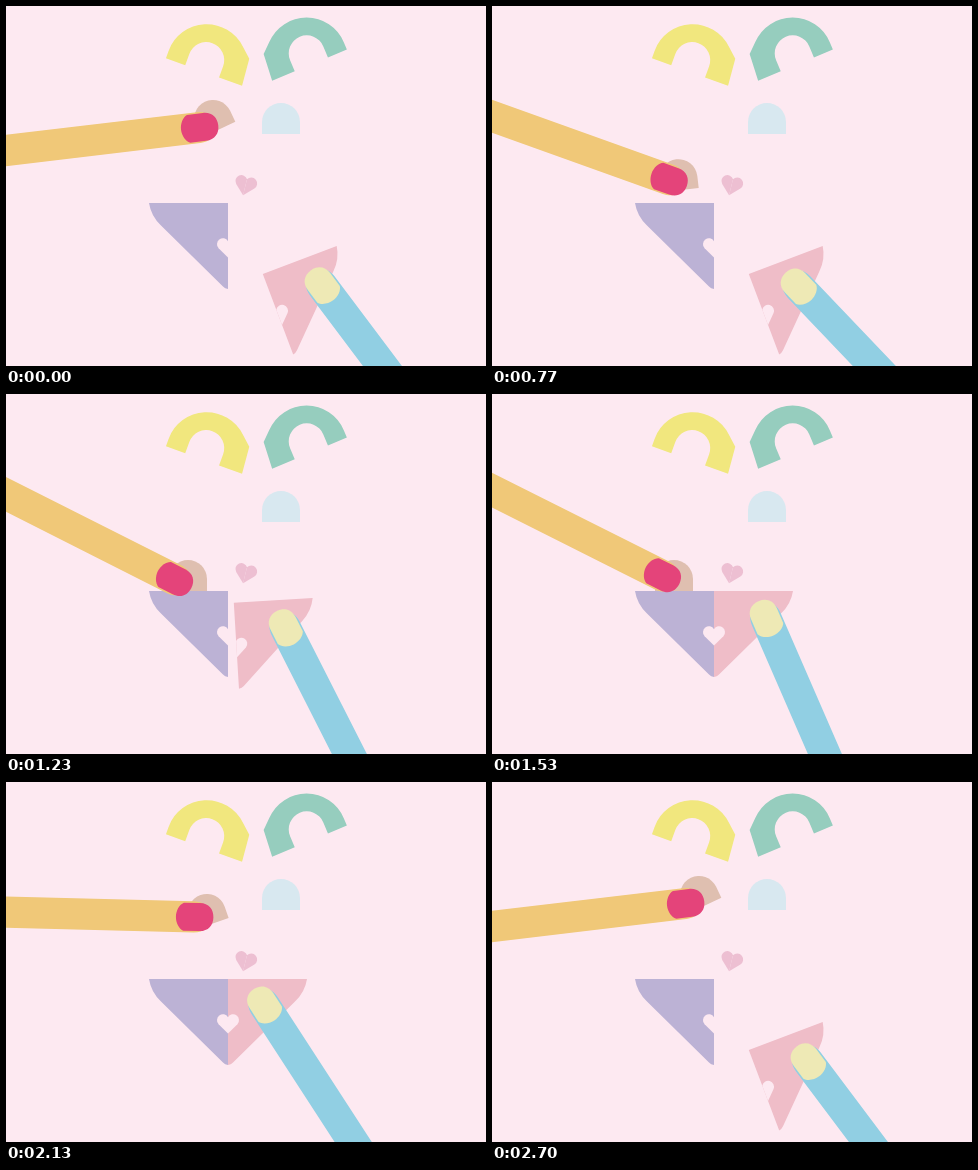
These frames come from a looping animation (480x360 px, 3160 ms). An HTML page with a canvas:

```html
<!DOCTYPE html>
<html lang="en">
<head>
<meta charset="utf-8">
<title>Paper pieces</title>
<style>
  html, body { margin: 0; width: 100%; height: 100%; overflow: hidden; background: #fde9f1; }
  canvas { display: block; width: 100vw; height: 100vh; }
</style>
</head>
<body>
<canvas id="stage"></canvas>
<script>
const W = 480, H = 360, LOOP = 3160, END = 2700, STEP = 100 / 3;
const BG = '#fde9f1';
const canvas = document.getElementById('stage');
const ctx = canvas.getContext('2d');

const pose = (x, y, deg) => ({ x, y, deg });

function ease(t, from, to) {
  const u = Math.min(1, Math.max(0, (t - from) / (to - from)));
  return u * u * (3 - 2 * u);
}

function mix(a, b, k) {
  const lerp = key => a[key] + (b[key] - a[key]) * k;
  return pose(lerp('x'), lerp('y'), lerp('deg'));
}

function at({ x, y, deg }, draw, flip = 1) {
  ctx.save();
  ctx.translate(x, y);
  ctx.rotate(deg * Math.PI / 180);
  ctx.scale(flip, 1);
  draw();
  ctx.restore();
}

function fill(path, color) {
  ctx.fillStyle = color;
  ctx.fill(new Path2D(path));
}

// An arch on two feet with one pointed shoulder
function arch(place, color, flip) {
  at(place, () => fill('M-40.5 0V-8A40.5 40.5 0 0 1 28 -37L38 -28L40.5 0H16V-12A18 18 0 0 0 -20 -12V0Z', color), flip);
}

function dome(place, color) {
  at(place, () => fill('M-19 12V0A19 19 0 0 1 19 0V12Z', color));
}

function halfHeart(color) {
  fill('M0 10.5V-5.8A5.9 5.9 0 1 1 9.4 1.2Z', color);
}

function heart(place, color) {
  for (const side of [-1, 1]) at(place, () => halfHeart(color), side);
}

// Half of the triangle: inner top corner at the origin, half a heart cut out
function wedge(place, color, flip) {
  at(place, () => {
    fill('M0 0H79Q77 13 67 22.5L5 83.5Q3 85.6 0 86Z', color);
    ctx.translate(0, 44);
    halfHeart(BG);
  }, flip);
}

// The nail sits on the origin, the tip points along the angle
function finger(place, skin, polish) {
  at(place, () => {
    fill('M-320 -15.6H-1C10 -15.6 16 -9 16 0C16 9 10 15.6 -1 15.6H-320Z', skin);
    fill('M-11 -14H5C14 -14 18.9 -8 18.9 0C18.9 8 14 14 5 14H-11C-15.5 12 -18.6 6 -18.6 0C-18.6 -6 -15.5 -12 -11 -14Z', polish);
  });
}

// Each hand settles on its piece, drags it home, shifts its grip and drags it back.
function leftHand(t) {
  const rest = pose(193.5, 121.5, -6.8), grip = pose(201.5, 119, -13);
  const home = pose(168.5, 185.5, 26.8), regrip = pose(173.5, 175.5, 26.4);
  const drag = ease(t, 445, 885), trail = ease(t, 400, 950), back = ease(t, 1830, 2280);

  const loose = pose(207, 113, -25.5), placed = pose(182, 185, 0);
  const piece = mix(mix(loose, placed, drag), loose, back);
  piece.deg = loose.deg * (1 - trail + back);
  dome(piece, '#dfbfb0');

  const held = mix(rest, grip, ease(t, 0, 445));
  const moved = mix(held, home, drag);
  moved.x = held.x + (home.x - held.x) * trail;
  const ready = mix(moved, regrip, ease(t, 1315, 1830));
  finger(mix(ready, rest, back), '#f0c878', '#e4447a');
}

function rightHand(t) {
  const rest = pose(316, 279.5, 233.1), grip = pose(306, 280.5, 226);
  const home = pose(274, 224.5, 246.5), regrip = pose(254.5, 222.5, 234.8);
  const drag = ease(t, 880, 1357), back = ease(t, 2255, 2700);

  const loose = pose(256.8, 268, -20.7), placed = pose(222, 197, 0);
  wedge(mix(loose, placed, drag - back), '#efbdc8', 1);

  const moved = mix(mix(rest, grip, ease(t, 440, 820)), home, drag);
  const ready = mix(moved, regrip, ease(t, 1830, 2250));
  finger(mix(ready, rest, back), '#91cfe3', '#eee9b5');
}

function draw(t) {
  ctx.fillStyle = BG;
  ctx.fillRect(0, 0, W, H);
  arch(pose(198, 66, 20), '#f1e77e', 1);
  arch(pose(303.5, 59.2, -22.7), '#96cdbe', -1);
  dome(pose(275, 116, 0), '#d8e8f0');
  heart(pose(239.6, 179, 14), '#edbfd2');
  wedge(pose(222, 197, 0), '#bcb2d5', -1);
  leftHand(t);
  rightHand(t);
}

function resize() {
  const ratio = window.devicePixelRatio || 1;
  canvas.width = Math.round(innerWidth * ratio);
  canvas.height = Math.round(innerHeight * ratio);
}

const start = performance.now();
function tick() {
  const t = (performance.now() - start) % LOOP;
  // The motion runs at thirty steps a second, then rests
  const stepped = Math.min(END, Math.floor((t + 3.4) / STEP) * STEP);
  ctx.setTransform(canvas.width / W, 0, 0, canvas.height / H, 0, 0);
  draw(stepped);
  requestAnimationFrame(tick);
}

addEventListener('resize', resize);
resize();
tick();
</script>
</body>
</html>
```
